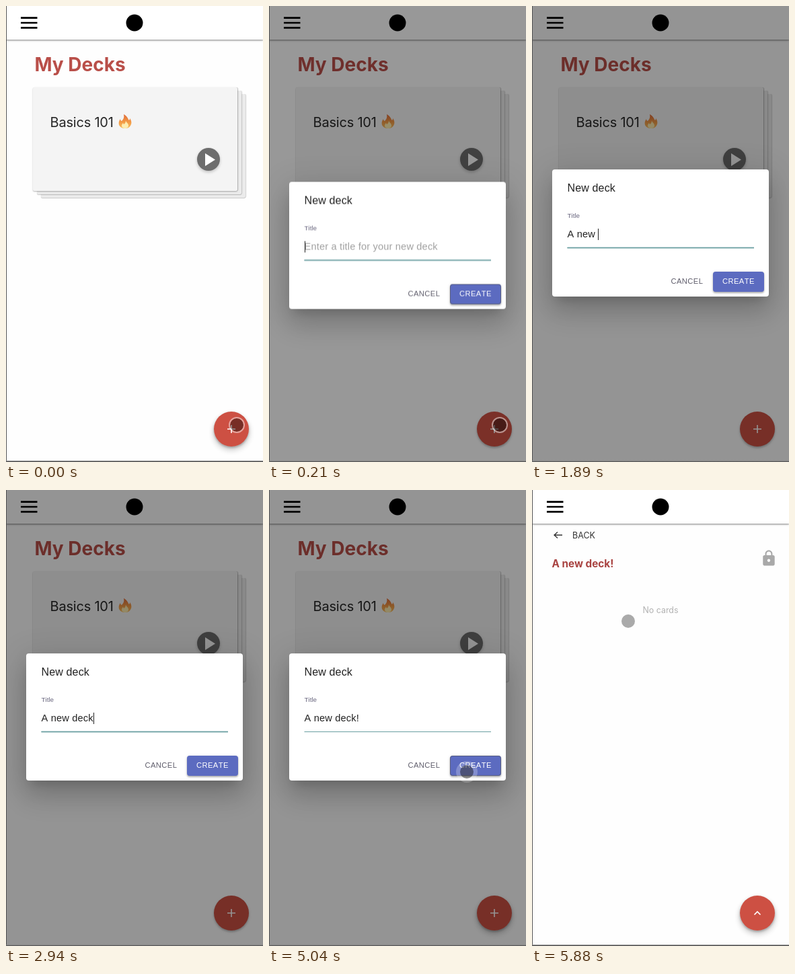
An HTML page that plays this animation: 382 by 678 pixels, repeating every 5.95 s.

```html
<!DOCTYPE html>
<html lang="en">
<head>
<meta charset="utf-8">
<title>New deck</title>
<style>
  html, body { margin: 0; width: 100%; height: 100%; overflow: hidden; background: #fff; }
  #stage { position: relative; width: 382px; height: 678px; overflow: hidden; background: #fefefe; }
  #stage div, #stage svg { position: absolute; box-sizing: border-box; }
  svg { left: 0; top: 0; overflow: visible; }
  text { font-family: Inter, sans-serif; }
  .helv, .helv text { font-family: "Liberation Sans", Arial, sans-serif; font-kerning: none; }
  .fill { inset: 0; }
  #header { left: 0; top: 0; width: 382px; height: 50px; background: #fff;
    box-shadow: 0 1px 2px rgba(0,0,0,.38), 0 2px 3px rgba(0,0,0,.12); }
  .card { width: 304px; height: 154px; background: #ebebeb; border-radius: 2px;
    box-shadow: 0 1px 1px rgba(0,0,0,.2), 1px 0 1px rgba(0,0,0,.16); }
  .card.front { background: #f4f4f4; box-shadow: 0 1px 2px rgba(0,0,0,.28), 1px 0 1px rgba(0,0,0,.2); }
  #run { left: 284px; top: 211px; width: 34px; height: 34px; border-radius: 50%; background: #6d6d6d;
    box-shadow: 0 2px 4px rgba(0,0,0,.22); }
  #fab, #lift { left: 309px; top: 603px; width: 52px; height: 52px; border-radius: 50%; }
  #fab { background: #cd5043; box-shadow: 0 2px 3px rgba(0,0,0,.2), 0 2px 5px rgba(0,0,0,.1); }
  #lift { box-shadow: 0 5px 7px 2px rgba(0,0,0,.14); }
  #shade { background: #000; opacity: 0; }
  #dialog { left: 30px; top: 243px; width: 322px; height: 189px; background: #fff; border-radius: 4px;
    box-shadow: 0 11px 15px -7px rgba(0,0,0,.17), 0 24px 38px 3px rgba(0,0,0,.12), 0 9px 46px 8px rgba(0,0,0,.12); }
  #create { left: 239px; top: 152px; width: 76px; height: 30px; border-radius: 4px; background: #5c6bc0;
    box-shadow: 0 2px 2px rgba(0,0,0,.2), 0 1px 4px rgba(0,0,0,.18); }
  #focus { border-radius: 4px; border: 1px solid rgba(80,80,70,.5); }
  .entry { left: 22.5px; top: 86px; white-space: pre; font-size: 14.6px; line-height: 20px; letter-spacing: .17px; color: #222; }
  #hint { color: #a0a0a0; }
  #caret { position: absolute; top: 2px; width: 1px; height: 17px; background: #222; }
  #cursor { left: 0; top: 0; width: 0; height: 0; }
  #dot { left: -10px; top: -10px; width: 20px; height: 20px; border-radius: 50%; background: rgba(0,0,0,.42); }
  #ring { left: -12px; top: -12px; width: 24px; height: 24px; border-radius: 50%; border: 2px solid rgba(255,255,255,.48); }
  #halo { left: -16px; top: -16px; width: 32px; height: 32px; border-radius: 50%; background: rgba(255,255,255,.24); }
  #left { left: 0; top: 0; width: 1px; height: 678px; background: #555; }
  #foot { left: 0; top: 676px; width: 382px; height: 2px; background: linear-gradient(#999, #444); }
</style>
</head>
<body>
<div id="stage">
  <div id="decks" class="fill">
    <div class="card" style="left:52px;top:131px"></div>
    <div class="card" style="left:46px;top:126px"></div>
    <div class="card front" style="left:40px;top:121px"></div>
    <div id="run"></div>
    <svg width="382" height="678">
      <defs>
        <linearGradient id="fire" x2="0" y2="1">
          <stop offset="0" stop-color="#de6a38"/><stop offset=".55" stop-color="#f39a45"/><stop offset="1" stop-color="#f6bd5e"/>
        </linearGradient>
      </defs>
      <text x="42.5" y="96.5" font-size="28" font-weight="700" fill="#b94f49">My Decks</text>
      <text x="65.5" y="179.5" font-size="20" letter-spacing="-.2" fill="#262626">Basics 101</text>
      <path d="M175 161c6 3 6 7 8 9 1-1 1-2 1-3 3 4 3 8 1 11-2 3-5 4-8 4s-7-1-9-5c-1-4 0-6 2-9 0 2 1 3 2 3 3-3 4-6 3-10z" fill="url(#fire)"/>
      <path d="M178 170c0 3 4 4 4 8 0 2-2 4-5 4s-5-2-5-4c0-2 1-3 2-4l1 2c2-1 3-3 3-6z" fill="#fdecb0"/>
      <path d="M296 219v19l15-9.5z" fill="#fff"/>
    </svg>
  </div>

  <svg id="deck" width="382" height="678">
    <path d="M45 67H33m5-4.5L33 67l5 4.5" fill="none" stroke="#333" stroke-width="1.3"/>
    <text x="60" y="71.7" font-size="12.5" fill="#333">BACK</text>
    <text x="29.5" y="115" font-size="15.3" font-weight="700" fill="#a94341">A new deck!</text>
    <text x="164.5" y="183" font-size="12.4" fill="#b2b2b2">No cards</text>
    <path transform="translate(338.9 88.4) scale(1.09)" fill="#a9a9a9" d="M18 8h-1V6c0-2.76-2.24-5-5-5S7 3.24 7 6v2H6c-1.1 0-2 .9-2 2v10c0 1.1.9 2 2 2h12c1.1 0 2-.9 2-2V10c0-1.1-.9-2-2-2zm-6 9c-1.1 0-2-.9-2-2s.9-2 2-2 2 .9 2 2-.9 2-2 2zm3.1-9H8.9V6c0-1.71 1.39-3.1 3.1-3.1s3.1 1.39 3.1 3.1v2z"/>
  </svg>

  <div id="header">
    <svg width="382" height="50">
      <path d="M22 17.6h24.5M22 25h24.5M22 32.4h24.5" stroke="#000" stroke-width="2.7"/>
      <circle cx="191" cy="25" r="12.5"/>
    </svg>
  </div>

  <div id="lift"></div>
  <div id="fab"></div>
  <svg width="382" height="678" fill="none" stroke="#fff">
    <path id="plus" d="M329 629h12m-6-6v12" stroke-width="1.6"/>
    <path id="chevron" d="M330.5 631.5l4.5-4.5 4.5 4.5" stroke-width="1.7"/>
  </svg>

  <div id="shade" class="fill"></div>

  <div id="dialog" class="helv">
    <div id="create"><div id="focus" class="fill"></div></div>
    <svg width="322" height="189">
      <g fill="#6a9fa1">
        <rect x="22.5" y="116" width="277.5" height="1"/>
        <rect id="thick" x="22.5" y="115.6" width="277.5" height="1.8"/>
      </g>
      <text x="22.5" y="33" font-size="16" letter-spacing=".15" fill="#222">New deck</text>
      <text id="label" x="22.5" y="72" font-size="9.8" fill="#6b6880">Title</text>
      <g font-size="11.2" letter-spacing=".4">
        <text x="176.5" y="170" fill="#5f5d6b">CANCEL</text>
        <text x="253" y="170" fill="#fff">CREATE</text>
      </g>
    </svg>
    <div id="hint" class="entry">Enter a title for your new deck</div>
    <div class="entry"><span id="typed"></span><i id="caret"></i></div>
  </div>

  <div id="cursor">
    <div id="halo"></div>
    <div id="dot"></div>
    <div id="ring"></div>
  </div>
  <div id="left"></div>
  <div id="foot"></div>
</div>

<script>
  const LOOP = 5950, TICK = 70;
  const OUT = 'cubic-bezier(0,0,.2,1)', IN = 'cubic-bezier(.4,0,.6,1)', STEP = 'step-end';
  const $ = id => document.getElementById(id);
  const anims = [];

  // Each row: time in ms, properties, easing towards the next row.
  function play(id, rows) {
    const keys = rows.map(([ms, props, easing = 'linear']) => ({ ...props, easing, offset: ms / LOOP }));
    keys.push({ ...rows.at(-1)[1], offset: 1 });
    const a = $(id).animate(keys, { duration: LOOP, iterations: Infinity });
    a.pause();
    anims.push(a);
  }
  const fade = (id, rows) => play(id, rows.map(([ms, opacity, e = STEP]) => [ms, { opacity }, e]));
  const slide = (y, opacity) => ({ transform: `translateY(${y}px)`, opacity });

  // Dialog and backdrop
  play('dialog', [
    [0, slide(435, 0), STEP], [47, slide(435, 1), OUT], [272, slide(0, 1)],
    [5080, slide(0, 1), IN], [5275, slide(435, 1), STEP], [5276, slide(435, 0)]
  ]);
  fade('shade', [[0, 0], [47, 0, OUT], [272, .42], [5080, .42, IN], [5275, 0]]);
  play('label', [[0, slide(2, 1)], [140, slide(2, 1)], [210, slide(0, 1)]]);
  fade('thick', [[0, 0], [210, 1], [4970, 0]]);
  fade('focus', [[0, 1], [280, 0], [4970, 1]]);

  // Pages
  fade('decks', [[0, 1], [5320, 0]]);
  fade('plus', [[0, 1], [5320, 0]]);
  fade('deck', [[0, 0], [5320, 1]]);
  fade('chevron', [[0, 0], [5320, 1]]);
  fade('lift', [[0, 1], [140, 0], [4970, 1]]);

  // Pointer
  play('cursor', [
    [0, 343, 623], [630, 343, 623], [840, 228, 392], [1120, 206, 350],
    [3640, 232, 322], [3710, 240, 323], [3850, 269, 330], [4270, 296, 388], [4620, 294, 419],
    [5530, 294, 419], [5670, 180, 262], [5740, 112, 206], [5880, 143, 195]
  ].map(([ms, x, y]) => [ms, { transform: `translate(${x}px,${y}px)` }]));
  fade('dot', [[0, 1], [1260, 0], [3710, 1], [5530, .79]]);
  fade('ring', [[0, 1], [280, 0]]);
  fade('halo', [[0, 0], [4970, 1], [5180, 0]]);

  // Typing: moment of each key, and moments at which the caret toggles
  const title = 'A new deck!';
  const keyTimes = [1260, 1400, 1540, 1680, 1820, 1890, 2100, 2450, 2590, 2730, 3150];
  const blinks = [630, 1120, 3710, 4200, 4690];

  const start = performance.now();
  function draw() {
    const now = (performance.now() - start) % LOOP;
    const t = Math.floor(now / TICK) * TICK + 1;
    for (const a of anims) a.currentTime = t;
    const count = keyTimes.filter(k => k <= t).length;
    $('typed').textContent = title.slice(0, count);
    $('hint').style.opacity = count ? 0 : 1;
    $('caret').style.opacity = blinks.filter(b => b <= t).length % 2 ? 0 : 1;
    requestAnimationFrame(draw);
  }
  draw();
</script>
</body>
</html>
```
